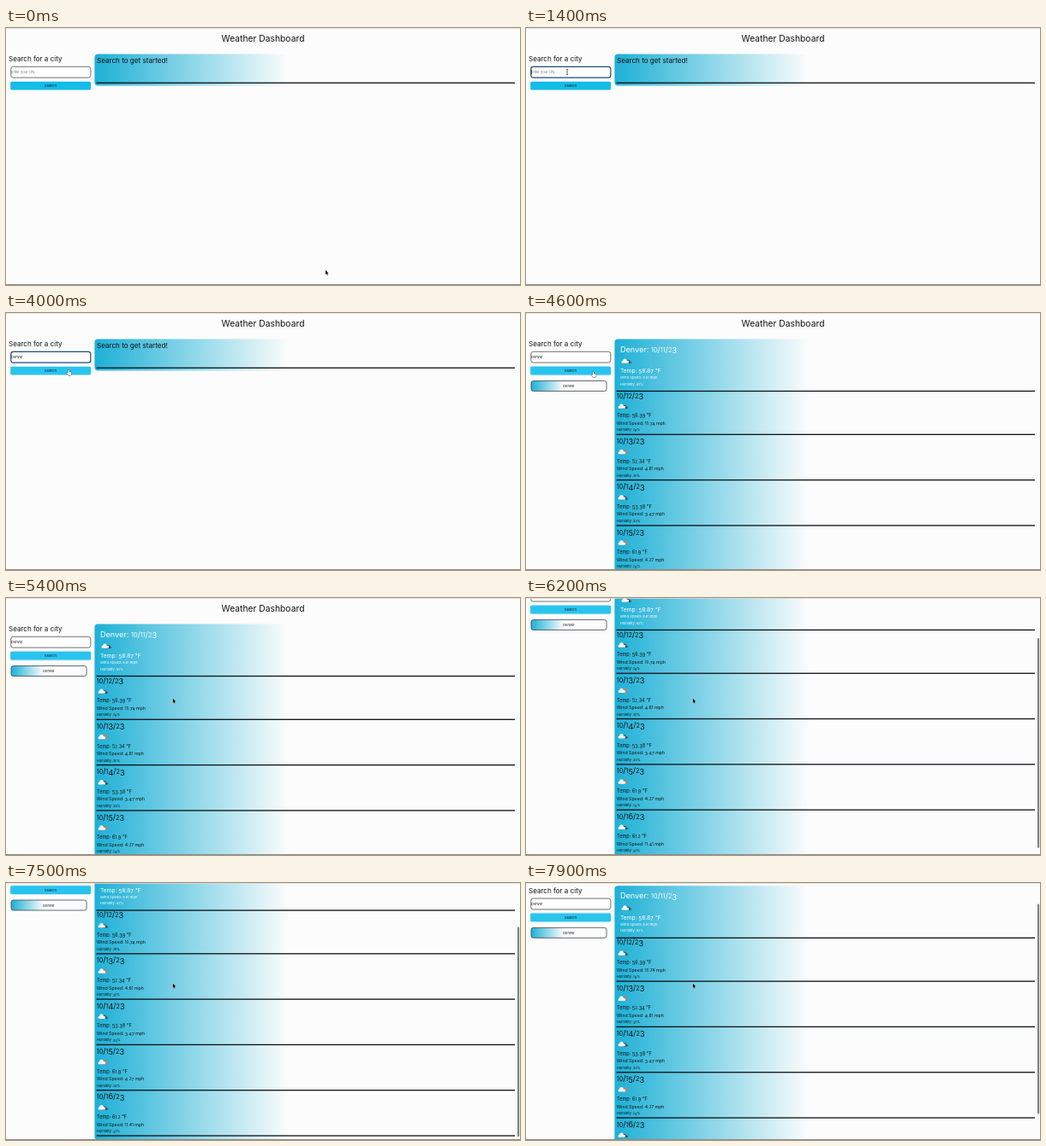
Write an HTML page with a canvas that moves like this. It is 600 by 301 pixels and loops after 8000 ms.

```html
<!DOCTYPE html>
<html lang="en">
<head>
<meta charset="utf-8">
<title>Weather Dashboard</title>
<style>
  html, body { margin: 0; width: 100%; height: 100%; overflow: hidden; background: #fcfcfc; }
  canvas { display: block; width: 600px; height: 301px; }
</style>
</head>
<body>
<canvas id="stage"></canvas>
<script>
const W = 600, H = 301, LOOP = 8000, PAGE_HEIGHT = 362.5;
const PAPER = '#fcfcfc', INK = '#111', BLUE = '#1db0d6';
const canvas = document.getElementById('stage');
const ctx = canvas.getContext('2d');
const ratio = window.devicePixelRatio || 1;
canvas.width = W * ratio;
canvas.height = H * ratio;

const FOCUS = 800, CLICK = 4100, LOADED = 4300, SCROLLING = 5800;
const KEY_TIMES = [2400, 2500, 2700, 2900, 3000, 3200];

const today = { temp: '58.87', wind: '8.61', humidity: 62 };
const forecast = [
  { date: '10/12/23', temp: '56.39', wind: '10.74', humidity: 29 },
  { date: '10/13/23', temp: '52.34', wind: '4.81', humidity: 30, sunny: true },
  { date: '10/14/23', temp: '53.38', wind: '3.47', humidity: 33 },
  { date: '10/15/23', temp: '61.9', wind: '4.27', humidity: 24, sunny: true },
  { date: '10/16/23', temp: '61.2', wind: '11.41', humidity: 32 }
];

// Keys are [time, value]; values ease between neighbours.
function track(t, keys) {
  if (t <= keys[0][0]) return keys[0][1];
  for (let i = 1; i < keys.length; i++) {
    const [t0, a] = keys[i - 1], [t1, b] = keys[i];
    if (t < t1) {
      const p = (t - t0) / (t1 - t0);
      return a + (b - a) * p * p * (3 - 2 * p);
    }
  }
  return keys[keys.length - 1][1];
}

// Lays text out at a large size and scales it down; figures are old-style.
function text(str, x, y, size, color = INK, align = 'left') {
  ctx.save();
  ctx.translate(x, y);
  ctx.scale(size / 100, size / 100);
  ctx.fillStyle = color;
  const setFont = px => { ctx.font = `${px}px Inter, sans-serif`; };
  setFont(100);
  let pen = align === 'center' ? -ctx.measureText(str).width / 2 : 0;
  for (const run of str.match(/[012]+|[34579]+|[^0-579]+/g)) {
    setFont(/[012]/.test(run) ? 80 : 100);
    ctx.fillText(run, pen, /[34579]/.test(run) ? 15 : 0);
    pen += ctx.measureText(run).width;
  }
  ctx.restore();
  return pen * size / 100;
}

function box(x, y, w, h, radius, fill, stroke, lineWidth = 1) {
  ctx.beginPath();
  ctx.roundRect(x, y, w, h, radius);
  if (fill) { ctx.fillStyle = fill; ctx.fill(); }
  if (stroke) { ctx.strokeStyle = stroke; ctx.lineWidth = lineWidth; ctx.stroke(); }
}

function fade(x0, x1) {
  const gradient = ctx.createLinearGradient(x0, 0, x1, 0);
  gradient.addColorStop(0, BLUE);
  gradient.addColorStop(1, PAPER);
  return gradient;
}

function panel(height) {
  box(103.4, 30.5, 490.6, height, 4, fade(103, 330));
}

function rule(y) {
  ctx.fillStyle = '#0a1114';
  ctx.fillRect(105.5, y - 0.65, 488.5, 1.3);
}

function polygon(points, fill, stroke) {
  ctx.beginPath();
  points.forEach(([x, y]) => ctx.lineTo(x, y));
  ctx.closePath();
  ctx.fillStyle = fill;
  ctx.strokeStyle = stroke;
  ctx.lineWidth = 0.7;
  ctx.stroke();
  ctx.fill();
}

function cloud(x, y, color, scale = 1) {
  ctx.save();
  ctx.translate(x, y);
  ctx.scale(scale, scale);
  ctx.fillStyle = color;
  ctx.beginPath();
  ctx.arc(1.6, 4.3, 1.6, Math.PI / 2, Math.PI * 1.5);
  ctx.arc(4.2, 2.5, 2.4, Math.PI, 0);
  ctx.arc(7.7, 4.3, 1.6, -Math.PI / 2, Math.PI / 2);
  ctx.fill();
  ctx.restore();
}

function weatherIcon(x, y, sunny) {
  if (sunny) {
    ctx.fillStyle = '#e0704f';
    ctx.beginPath();
    ctx.arc(x + 8, y + 2.6, 2, 0, 7);
    ctx.fill();
  }
  cloud(x + 4.4, y + 1.6, sunny ? '#9a8a86' : '#3c4347', 0.74);
  cloud(x, y + 0.3, '#f6f6f6', 0.94);
}

function reading(day, x, y, sizes, color) {
  text(`Temp: ${day.temp} °F`, x, y, sizes[0], color);
  text(`Wind Speed: ${day.wind} mph`, x, y + sizes[1], sizes[2], color);
  text(`Humidity: ${day.humidity}%`, x, y + sizes[3], 3.95, color);
}

function drawResults() {
  panel(330);
  text('Denver: 10/11/23', 110, 45.5, 9.1, '#fff');
  weatherIcon(111.5, 53, false);
  reading(today, 110, 70, [6.65, 7.1, 4.15, 14.6], '#fff');
  rule(91.5);
  forecast.forEach((day, i) => {
    const y = 53.3 * i;
    text(day.date, 105.7, y + 99.6, 9.05);
    weatherIcon(107.5, y + 106, day.sunny);
    reading(day, 106, y + 122.3, [5.6, 8.5, 5.2, 16], INK);
    rule(y + 142.3);
  });
  box(6, 79.5, 88, 12, 2.5, fade(6, 44), '#3b474c', 0.8);
  text('Denver', 50, 87.1, 4.05, INK, 'center');
}

function drawSearch(t) {
  text('Search for a city', 3, 38.8, 8.05);
  const focused = t >= FOCUS && t < CLICK;
  box(5.8, 45.3, 93, 12.8, 2.6, '#fff', focused ? '#1f4a78' : '#626262', focused ? 1.2 : 0.9);
  const typed = 'Denver'.slice(0, KEY_TIMES.filter(k => t >= k).length);
  const width = text(typed || 'Enter your city...', 6, 53.3, 4, typed ? INK : '#777');
  const typing = t >= 2400 && t < 3400;
  if (focused && (typing || (t - FOCUS) % 1000 >= 500)) {
    ctx.fillStyle = INK;
    ctx.fillRect(6.2 + (typed ? width : 0), 49, 0.6, 5.4);
  }
  if (t >= CLICK) box(4.8, 62.3, 94.4, 10.6, 2, null, '#b5e4f3', 0.8);
  box(5.2, 62.7, 93.8, 9.8, 1.5, t >= 3600 ? '#29c4ed' : '#13bce9');
  text('Search', 52, 69, 4.15, INK, 'center');
}

function drawCursor(t) {
  if (t >= 2400 && t < 3400) return;
  const x = track(t, [[0, 373], [450, 48], [3400, 48], [3750, 72.5], [4500, 72.5], [5300, 194.8]]);
  const y = track(t, [[0, 283.5], [450, 51], [3400, 52], [3750, 66.5], [4500, 66.5], [5300, 117.6]]);
  ctx.save();
  ctx.translate(x, y);
  if (y > 45 && y < 59 && x < 99) {
    ctx.fillStyle = '#222';
    ctx.fillRect(-0.3, -2.5, 0.7, 6);
    ctx.fillRect(-1.2, -2.8, 2.5, 0.5);
    ctx.fillRect(-1.2, 3.3, 2.5, 0.5);
  } else if (y >= 62 && y < 73 && x < 99) {
    polygon([[0, 0], [1, 0], [1.2, 2.2], [3.8, 2.8], [3.8, 5], [3, 6.6], [0.6, 6.6], [-1.4, 4], [-1, 3.3], [0, 4]], '#fff', '#222');
  } else {
    polygon([[0, 0], [0, 5.3], [1.2, 4.3], [2, 6.2], [2.8, 5.8], [2, 4], [3.6, 3.9]], '#000', '#fff');
  }
  ctx.restore();
}

function draw(t) {
  const scroll = track(t, [[5700, 0], [6340, 61.5], [7400, 61.5], [8330, 0]]);
  ctx.setTransform(ratio, 0, 0, ratio, 0, 0);
  ctx.fillStyle = PAPER;
  ctx.fillRect(0, 0, W, H);

  ctx.save();
  ctx.translate(0, -scroll);
  text('Weather Dashboard', 300, 16.2, 10.3, INK, 'center');
  drawSearch(t);
  if (t >= LOADED) {
    drawResults();
  } else {
    panel(37);
    text('Search to get started!', 106, 41.3, 8.1);
    rule(64.3);
  }
  ctx.restore();

  if (t >= SCROLLING) {
    const k = H / PAGE_HEIGHT;
    box(597, scroll * k + 2, 2.2, H * k - 4, 1.1, '#808080');
  }
  ctx.fillStyle = '#dcdcdc';
  ctx.fillRect(0, 0, W, 0.8);
  ctx.fillStyle = '#8a8a8a';
  ctx.fillRect(0, 300, W, 1);
  drawCursor(t);
}

function frame() {
  draw(performance.now() % LOOP);
  requestAnimationFrame(frame);
}
frame();
</script>
</body>
</html>
```
